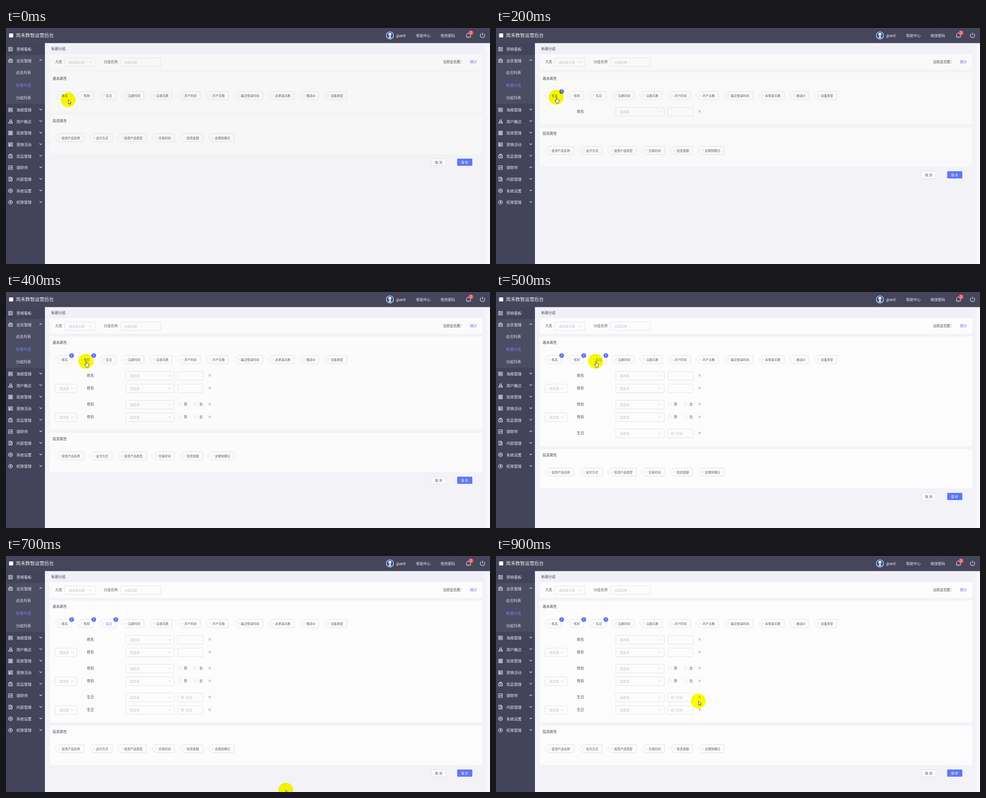
An HTML page that plays this animation: 1069x524 px, repeating every 1 s.

```html
<!DOCTYPE html>
<html lang="zh-CN">
<head>
<meta charset="utf-8">
<title>新建分组</title>
<style>
html, body { margin: 0; width: 100%; height: 100%; overflow: hidden; background: #f3f2f7; }
svg { display: block; width: 1069px; height: 524px; }
text { font-family: "Noto Sans CJK SC", "Noto Sans CJK", "Noto Sans", sans-serif; white-space: pre; }
.line { fill: none; stroke: #e2e3e8; }
.icon { fill: none; stroke: #f0f0f5; stroke-width: 1.1; }
.chev { fill: none; stroke: #c3c5cc; stroke-width: .9; }
.nav .chev { stroke: #e4e4ec; stroke-width: 1.1; }
.tag path, .tag circle { fill: none; stroke: #dcdde2; stroke-width: .9; }
.tag text { fill: #5a5a60; }
.tag.on text { fill: #5b70f0; }
.del { fill: none; stroke: #e8525c; stroke-width: .9; }
#halo { fill: #ff0; mix-blend-mode: multiply; }
</style>
</head>
<body>
<svg id="stage" viewBox="0 0 1069 524"></svg>
<script>
const NS = 'http://www.w3.org/2000/svg';
const stage = document.getElementById('stage');

function add(parent, name, attrs = {}, content) {
  const el = document.createElementNS(NS, name);
  for (const k in attrs) el.setAttribute(k, attrs[k]);
  if (content !== undefined) el.textContent = content;
  parent.append(el);
  return el;
}
const group = (p, attrs) => add(p, 'g', attrs);
const rect = (p, x, y, width, height, attrs) => add(p, 'rect', { x, y, width, height, ...attrs });
const dot = (p, cx, cy, r, attrs) => add(p, 'circle', { cx, cy, r, ...attrs });
const path = (p, d, attrs) => add(p, 'path', { d, ...attrs });
// y is the visual middle of the glyphs
const label = (p, s, x, y, size, fill, attrs) =>
  add(p, 'text', { x, y: y + size * .38, 'font-size': size, ...(fill && { fill }), ...attrs }, s);
const chevron = (p, x, y, up = 1) =>
  path(p, `M${x - 2.7} ${y - 1.3 * up}L${x} ${y + 1.4 * up}L${x + 2.7} ${y - 1.3 * up}`, { class: 'chev' });
const box = (p, x, y, w) => rect(p, x + .5, y - 9.5, w, 19, { class: 'line', rx: 1 });

const HINT = '#c0c2ca', INK = '#4a4a50', BLUE = '#5b70f0';

function select(p, x, y, w, hint = '请选择') {
  box(p, x, y, w);
  label(p, hint, x + 9.5, y, 7.1, HINT);
  chevron(p, x + w - 9.5, y);
}

function badge(p, x, y, fill, n) {
  const g = group(p);
  dot(g, x, y, 5.3, { fill });
  const t = label(g, n, x, y - .2, 7, '#fff', { 'text-anchor': 'middle' });
  return { g, t };
}

function tagRow(p, names, y) {
  let x = 108;
  return names.map(name => {
    const units = name.endsWith('id') ? 18.7 : name.length * 6.75;
    const end = x + 23.5 + units;
    const g = group(p, { class: 'tag' });
    path(g, `M${x} ${y}L${x + 8} ${y - 9}H${end - 1.5}q1.5 0 1.5 1.5V${y + 7.5}q0 1.5 -1.5 1.5H${x + 8}Z`);
    dot(g, x + 10.5, y, 2);
    label(g, name, x + 15, y + .4, 6.75);
    x = end + 11.8;
    return { g, end };
  });
}

// Page
const strip = rect(stage, 1062, 33, 7, 491, { fill: '#f8f8fb' });
rect(stage, 97, 37, 955, 21, { fill: '#f1f0f8' });
label(stage, '新建分组', 100, 46, 7.8, INK);

const panels = [rect(stage, 97, 58, 955, 34.5), rect(stage, 97, 99, 955, 87)];
label(stage, '大类', 108.5, 75.5, 7.8, '#66666c');
select(stage, 129, 76, 67, '请选择大类');
label(stage, '分组名称', 215.5, 75.5, 7.8, '#66666c');
box(stage, 252, 76, 89);
label(stage, '分组名称', 261.5, 76, 7.1, HINT);
label(stage, '当前会员数：', 965, 75, 7.7, INK);
label(stage, '统计', 1025, 75, 7.8, BLUE);

label(stage, '基本属性', 103, 112, 7.8, INK);
const tags = tagRow(stage, ['姓名', '性别', '生日', '注册时间', '注册天数', '开户时间',
  '开户天数', '最近登录时间', '未登录天数', '推送id', '设备类型'], 150);

// Condition rows, two for each of the first three tags
const rows = [];
['姓名', '性别', '生日'].forEach((name, kind) => {
  for (let n = 0; n < 2; n++) {
    const y = 186 + kind * 64 + n * 28;
    const g = group(stage);
    if (n) select(g, 108, y, 48);
    label(g, name, 178.8, y - .8, 7.8, INK);
    select(g, 264, y, 107);
    if (kind === 1) {
      ['男', '女'].forEach((s, i) => {
        dot(g, 383.5 + i * 34.7, y - .8, 3.4, { class: 'line' });
        label(g, s, 392.5 + i * 34.6, y - .8, 8, '#66666c');
      });
    } else {
      box(g, 379, y, 56);
    }
    if (kind === 2) {
      dot(g, 389.5, y, 3, { fill: 'none', stroke: HINT, 'stroke-width': .8 });
      path(g, `M389.5 ${y - 1.7}V${y + .3}H391`, { class: 'chev' });
      label(g, '时间', 397, y, 7.3, HINT);
    }
    path(g, `M447.4 ${y - 3.3}l4.8 4.8m0 -4.8l-4.8 4.8`, { class: 'del' });
    rows.push(g);
  }
});

// Everything below the growing panel
const lower = group(stage);
panels.push(rect(lower, 97, 193, 955, 87));
label(lower, '投资属性', 103, 205.8, 7.8, INK);
tagRow(lower, ['投资产品名称', '支付方式', '投资产品类型', '交易时间', '投资金额', '定期到期日'], 243.7);
rect(lower, 939.5, 290.5, 32, 15.5, { fill: '#fafafc', stroke: '#e2e3e8', rx: 1.5 });
label(lower, '取 消', 948, 298.5, 6.9, '#55555b');
rect(lower, 996.5, 290, 33.5, 16, { fill: '#6078f6', rx: 1.5 });
label(lower, '保 存', 1005.3, 298.5, 6.9, '#fff');

const badges = tags.slice(0, 3).map(t => badge(stage, t.end, 141, BLUE, 1));

// Sidebar
const nav = group(stage, { class: 'nav' });
rect(nav, 0, 33, 86, 491, { fill: '#43435b' });
rect(nav, 0, 60, 86, 108, { fill: '#4b4d62' });
const menu = [
  ['营销看板', 'M-4-4H4V4H-4ZM-1.8-4V4M0-1.8H2.6M0 0H2.6M0 1.8H2.6'],
  ['会员管理', 'M-4-1.5H4V4H-4ZM-4 1H4M-2-1.5V-4H0V-1.5M1.5-1.5L3-4'],
  ['海报管理', 'M-4-4H4V4H-4ZM-4 1.5H4M-2-2H0V0H-2ZM2-2V0'],
  ['用户触达', 'M-1.8-1.5A2.2 2.2 0 1 1 2.6-1.5A2.2 2.2 0 1 1-1.8-1.5M-4 4H4.2V2.2L2 1H-1.5L-4 2.5Z'],
  ['投放管理', 'M-4-4H-.8V-.8H-4ZM.8-4H4V-.8H.8ZM-4 .8H-.8V4H-4ZM.8 .8H4V4H.8Z'],
  ['营销活动', 'M-4.2-3.6H4.2V3.6H-4.2ZM-2.4 1.6V-.2H-.4V1.6ZM1.6-1.8V1.8M-2.4-1.8H0'],
  ['奖品管理', 'M-4-2.2H4V4H-4ZM-1.8-2.2V-4H1.8V-2.2M-2 .2Q0 2.4 2 .2'],
  ['理财师', 'M-4-4H4V4H-4ZM-2.6 1.6L-.8-.6L.6 .8L2.6-1.6'],
  ['内容管理', 'M-3.5-4.3H1L3.6-1.7V4.3H-3.5ZM1-4.3V-1.7H3.6M-1.7 .4H1.8M-1.7 2.3H1.8'],
  ['系统设置', 'M0-4.4L2-3.4L4-2.2V2.2L2 3.4L0 4.4L-2 3.4L-4 2.2V-2.2L-2-3.4ZM-1.4 0A1.4 1.4 0 1 1 1.4 0A1.4 1.4 0 1 1-1.4 0'],
  ['权限管理', 'M-4.2 0A4.2 4.2 0 1 1 4.2 0A4.2 4.2 0 1 1-4.2 0M-1.3-1A1.3 1.3 0 1 1 1.3-1A1.3 1.3 0 1 1-1.3-1M0 .3V2.7']
];
menu.forEach(([name, d], i) => {
  const y = i < 2 ? 47 + i * 25.5 : 181.8 + (i - 2) * 25.65;
  path(nav, d, { class: 'icon', transform: `translate(10 ${y})` });
  label(nav, name, 23, y, 8.4, '#ececf2');
  if (i) chevron(nav, 76.8, y - 1, i === 1 ? -1 : 1);
});
['会员列表', '新建分组', '分组列表'].forEach((s, i) =>
  label(nav, s, 22, 99 + i * 27.9, 8.3, i === 1 ? '#7381f2' : '#e4e4ec'));

// Header
rect(stage, 0, 0, 1069, 33.5, { fill: '#45455c' });
rect(stage, 6.8, 12, 9, 9, { fill: '#fff' });
label(stage, '岚禾数智运营后台', 22, 16.3, 10.45, '#f4f4f8');
dot(stage, 848, 16.5, 8, { fill: '#2f4f92', stroke: '#fff', 'stroke-width': 1.2 });
dot(stage, 848, 14, 3.3, { fill: '#f3f1f0' });
path(stage, 'M845.3 22.6V20q0-2 2.7-2t2.7 2V22.6Z', { fill: '#e6eaf4' });
label(stage, 'guest', 862, 16.5, 8.2, '#fff');
label(stage, '帮助中心', 906, 16.8, 8, '#f0f0f5');
label(stage, '修改密码', 959.7, 16.8, 8, '#f0f0f5');
path(stage, 'M1016 20H1027M1017.3 20V15.5a4.2 4.2 0 0 1 8.4 0V20M1020.2 21.8h2.6M1021.5 11.3V10.3',
  { class: 'icon', 'stroke-width': 1.3 });
badge(stage, 1027, 10.7, '#f25a60', 2);
path(stage, 'M1049.3 12.6A5 5 0 1 0 1055.5 12.6M1052.4 10.6V16.3', { class: 'icon', 'stroke-width': 1.3 });

// Pointer; its origin is the centre of the halo
const pointer = group(stage);
pointer.style.mixBlendMode = 'multiply';
dot(pointer, 0, 0, 16.5, { id: 'halo' });
const cursor = group(stage);
const arrow = path(cursor, 'M.3 -.2V9.2L2.5 7.3L4 10.5L5.5 9.8L4 6.8H6.7Z',
  { fill: '#fff', stroke: '#222', 'stroke-width': .8 });
const hand = path(cursor,
  'M-.3 1.2q0-1.2 1-1.2t1 1.2V4.5q.9-.8 1.6 .2q1-.6 1.5 .4q1.4-.3 1.4 1V9q0 1.4-1 2.4V13H0V11.6L-2.4 8.4q-.8-1.4 .4-1.6l1.7 1.3Z',
  { fill: '#fff', stroke: '#222', 'stroke-width': .8 });

// rows shown, pointer x, pointer y, hand?, highlighted tag
const STEP = 100;
const steps = [
  [0, 137.5, 159.5, 0, -1],
  [0, 133.5, 154, 1, 0],
  [1, 133, 153.8, 1, 0],
  [2, 152.5, 154, 0, 0],
  [4, 176.5, 154, 1, 1],
  [5, 220, 154, 1, 2],
  [6, 220, 154, 1, 2],
  [6, 618, 520, 0, 2],
  [6, 530, 420, 0, -1],
  [6, 447, 322, 0, -1]
];
let shown = -1;

function show(i) {
  const [count, x, y, isHand, lit] = steps[i];
  const shift = count * 28 + Math.max(0, Math.ceil(count / 2) - 1) * 8;
  const v = Math.min(252, 247 + i);
  panels.forEach(p => p.setAttribute('fill', `rgb(${v},${v},${v + 1})`));
  panels[1].setAttribute('height', 87 + shift);
  lower.setAttribute('transform', `translate(0 ${shift})`);
  rows.forEach((g, n) => g.style.display = n < count ? '' : 'none');
  badges.forEach(({ g, t }, n) => {
    const total = Math.min(2, count - n * 2);
    g.style.display = total > 0 ? '' : 'none';
    t.textContent = total;
  });
  tags.forEach(({ g }, n) => g.classList.toggle('on', n === lit));
  pointer.setAttribute('transform', `translate(${x} ${y})`);
  cursor.setAttribute('transform', `translate(${x} ${y})`);
  arrow.style.display = isHand ? 'none' : '';
  hand.style.display = isHand ? '' : 'none';
}

function tick() {
  const i = Math.floor(performance.now() / STEP) % steps.length;
  if (i !== shown) show(shown = i);
  requestAnimationFrame(tick);
}
tick();
</script>
</body>
</html>
```
